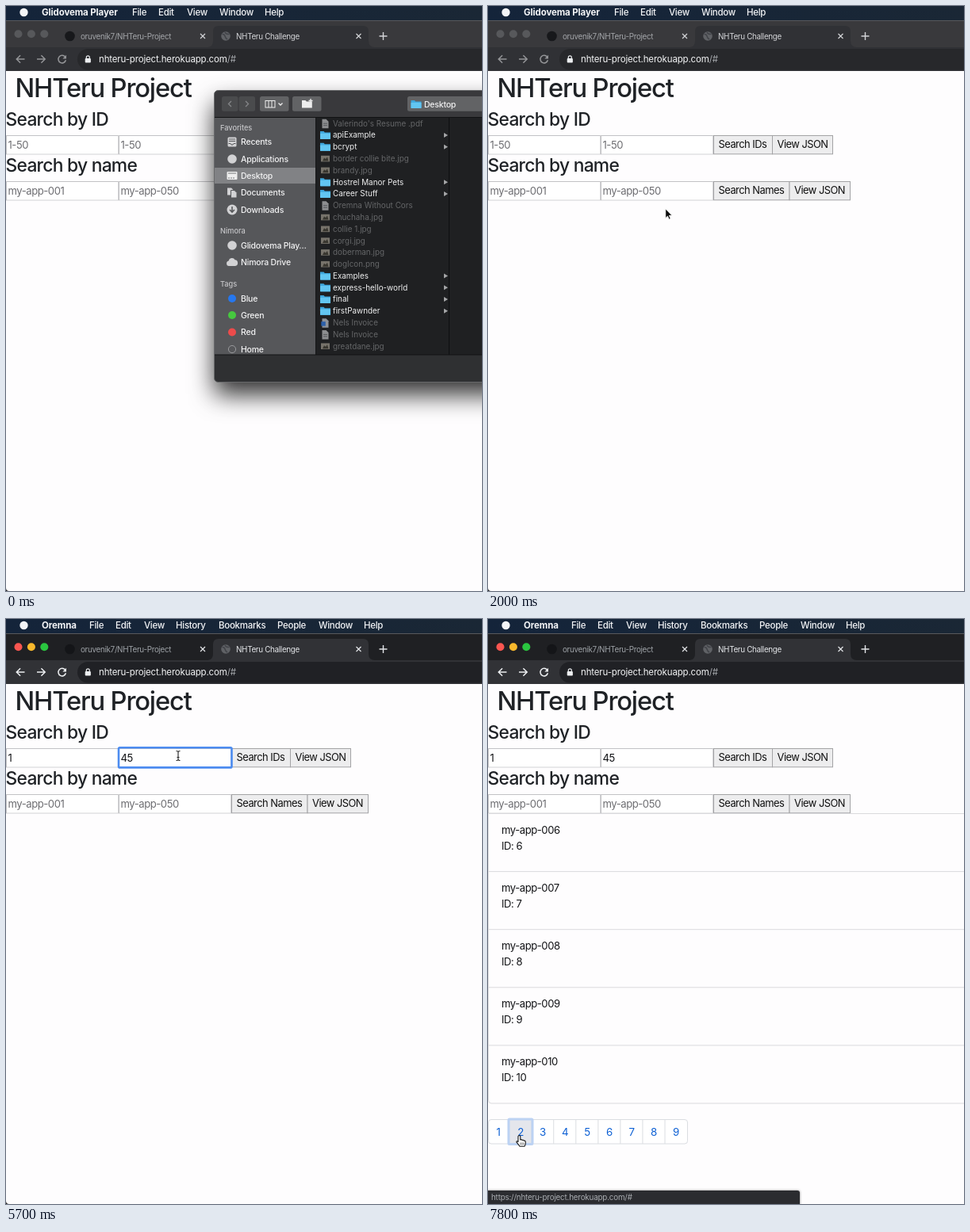
An HTML page for the animation above (8 s loop, 600 by 738 pixels).

```html
<!DOCTYPE html>
<html lang="en">
<head>
<meta charset="utf-8">
<title>Search demo</title>
<style>
  html, body { margin: 0; width: 100%; height: 100%; overflow: hidden; background: #fefdfe; }
  svg { display: block; width: 600px; height: 738px; font-family: Inter, Roboto, "Liberation Sans", sans-serif;
    --strip: #39393c; --bar: #303135; --pill: #27282b; --nav: #939497; --tab: #a2a4a8; --tabOn: #d3d4d7; --mark: #17181b; }
  svg.active { --strip: #1f2023; --bar: #313236; --pill: #202125; --nav: #eceef0; --tab: #9da1a6; --tabOn: #e3e5e8; --mark: #141518; }
  text { white-space: pre; }
  .menu { font-size: 11.5px; font-weight: 500; letter-spacing: -.025em; fill: #f4f5f7; }
  .app { font-weight: 700; letter-spacing: -.01em; }
  .tab { font-size: 9.9px; letter-spacing: -.033em; }
  .url { font-size: 11.5px; letter-spacing: -.014em; fill: #f3f4f5; }
  .h1 { font-size: 32.7px; font-weight: 500; letter-spacing: -.035em; fill: #1f2226; }
  .h3 { font-size: 22.8px; font-weight: 500; letter-spacing: -.032em; fill: #1f2226; }
  .body { font-size: 13.1px; letter-spacing: -.035em; fill: #121316; }
  .hint { fill: #6d6d71; }
  .btn { font-size: 12.9px; letter-spacing: -.04em; fill: #111; }
  .page { font-size: 13.3px; fill: #0d60d4; text-anchor: middle; }
  .head { font-size: 9.2px; font-weight: 500; fill: #c6c6c9; }
  .side { font-size: 10.5px; font-weight: 500; letter-spacing: -.02em; fill: #f2f2f3; }
  .file { font-size: 9.9px; fill: #656668; }
  .dir { fill: #f0f0f1; }
  .tip { font-size: 9.9px; letter-spacing: -.022em; fill: #a9acb0; }
  .nav { fill: none; stroke: var(--nav); stroke-width: 1.5; }
  filter { color-interpolation-filters: sRGB; }
</style>
</head>
<body>
<svg id="stage" viewBox="0 0 600 738" width="600" height="738"></svg>
<script>
const LOOP = 8000, STEP = 100;
const BRAND = 'NHTeru', SITE = 'nhteru-project.herokuapp.com';
const stage = document.getElementById('stage');

const text = (x, y, cls, str, more = '') => `<text x="${x}" y="${y}" class="${cls}" ${more}>${str}</text>`;
const rect = (x, y, w, h, fill, more = '') => `<rect x="${x}" y="${y}" width="${w}" height="${h}" fill="${fill}" ${more}/>`;
const circle = (x, y, r, fill, more = '') => `<circle cx="${x}" cy="${y}" r="${r}" fill="${fill}" ${more}/>`;
const path = (d, more) => `<path d="${d}" ${more}/>`;
const group = (id, inner) => `<g id="${id}">${inner}</g>`;
const line = (color, width = 1) => `fill="none" stroke="${color}" stroke-width="${width}"`;

function menu(id, app, items) {
  return group(id, text(45, 12, 'menu app', app) + items.map(([x, s]) => text(x, 12, 'menu', s)).join(''));
}

function lights(id, colors) {
  return group(id, colors.map((c, i) => circle(15.5 + i * 16.4, 35.3, 5, c)).join(''));
}

function browser() {
  const cross = x => path(`M${x - 3} 35l6 6m0 -6l-6 6`, line('var(--tabOn)', 1.2));
  return rect(0, 0, 600, 18, 'url(#sky)') +
    circle(22.5, 8, 5.2, '#f4f5f7') +
    menu('menuIdle', 'Glidovema Player', [[159, 'File'], [192, 'Edit'], [228, 'View'], [269, 'Window'], [326, 'Help']]) +
    menu('menuActive', 'Oremna', [[105, 'File'], [138, 'Edit'], [174, 'View'], [214, 'History'],
      [268, 'Bookmarks'], [342, 'People'], [394, 'Window'], [451, 'Help']]) +
    rect(0, 18, 600, 34, 'var(--strip)') + rect(0, 18, 600, 1, '#58595c') +
    lights('lightsIdle', ['#57585b', '#57585b', '#57585b']) +
    lights('lightsActive', ['#fb5650', '#f9b92c', '#2ac53f']) +
    path('M253 52Q261 52 261 44V32Q261 25 268 25H450Q457 25 457 32V44Q457 52 465 52Z', 'fill="var(--bar)"') +
    circle(80.5, 38, 6.3, 'var(--mark)') +
    text(94, 41.6, 'tab', `oruvenik7/${BRAND}-Project`, 'fill="var(--tab)"') + cross(248) +
    circle(277, 38, 5.8, '#606266') +
    path('M272.5 35.5q3 0 3.5 2.5t3 4M276 33q1 3 5.5 2.5', line('#414348', 1.5)) +
    text(290, 41.6, 'tab', `${BRAND} Challenge`, 'fill="var(--tabOn)"') + cross(444.5) +
    path('M470.5 38h10m-5 -5v10', line('var(--tabOn)', 1.4)) +
    rect(0, 52, 600, 30, 'var(--bar)') +
    rect(90, 54, 560, 26.5, 'var(--pill)', 'rx="13.2"') +
    path('M23.5 67H13.5m4.6 -4.8L13.3 67l4.8 4.8M39 67h10m-4.6 -4.8L49.2 67l-4.8 4.8', 'class="nav"') +
    path('M74.6 64.2A4.8 4.8 0 1 0 75.4 68.3', 'class="nav"') + path('M76 61.8v4.6h-4.6z', 'fill="var(--nav)"') +
    rect(99.7, 66, 7.2, 5.6, '#eceef0', 'rx="1"') + path('M101.3 66.5v-1.7a2 2 0 0 1 4 0v1.7', line('#eceef0', 1.2)) +
    `<text x="117" y="71.1" class="url">${SITE}<tspan fill="#a3a6aa">/#</tspan></text>`;
}

function field(x, y, id, hint) {
  return rect(x + .5, y + .5, 141, 23.5, '#fff', 'stroke="#d2d2d5"') +
    path(`M${x + .5} ${y + 24}V${y + .5}h141`, line('#c2c2c5')) +
    text(x + 2.5, y + 16.6, 'body hint', hint, `id="${id}"`);
}

function button(x, y, w, label) {
  return rect(x + .5, y + .5, w, 23.3, '#ededee', 'stroke="#a3a3a5"') + text(x + 6.5, y + 16.4, 'btn', label);
}

function page() {
  const ring = (id, x) => group(id, rect(x, 162.2, 142.5, 25.2, 'none', 'rx="1.5" stroke="#4c8cf0" stroke-width="2.6"'));
  return rect(0, 82, 600, 656, '#fefdfe') +
    text(11.5, 115, 'h1', `${BRAND} Project`) +
    text(-.5, 151, 'h3', 'Search by ID') + text(-.5, 209.2, 'h3', 'Search by name') +
    field(0, 163, 'from', '1-50') + field(142, 163, 'to', '1-50') +
    field(0, 221, 'nameFrom', 'my-app-001') + field(142, 221, 'nameTo', 'my-app-050') +
    button(284, 163, 74, 'Search IDs') + button(358, 163, 76, 'View JSON') +
    button(284, 221, 95.5, 'Search Names') + button(379.5, 221, 76.5, 'View JSON') +
    ring('ringFrom', .5) + ring('ringTo', 142) +
    rect(0, 168, 1, 14, '#111', 'id="caret"');
}

function results() {
  let s = path('M600 611H4Q.5 611 .5 607V245.5H600', line('#dadadd'));
  for (let i = 0; i < 5; i++) {
    const y = 245.5 + i * 73.1;
    if (i) s += path(`M0 ${y}H600`, line('#dadadd'));
    s += text(17, y + 25.4, 'body', '', `id="name${i}"`) + text(17, y + 45.2, 'body', '', `id="num${i}"`);
  }
  s += rect(.5, 631.5, 251, 30.5, '#fff', 'rx="3.5" stroke="#dadde1"') +
    rect(27, 632, 27.5, 29.5, '#e4e6ec', 'id="hover"');
  for (let i = 0; i < 9; i++) {
    if (i) s += path(`M${-1.4 + i * 28.05} 632V662`, line('#dadde1'));
    s += text(13.2 + i * 28, 652, 'page', i + 1);
  }
  return group('results', s + rect(26, 631, 30, 31.5, 'none', 'id="ringPage" rx="1" stroke="#bcd2f3" stroke-width="3"'));
}

const folder = (x, y) => path(`M${x - 6.5} ${y - 5}h4.5l1.3 1.5h7.2v8.5h-13z`, 'fill="#3ea6dc"') +
  rect(x - 6.5, y - 2.3, 13, 7.3, '#62c5f1', 'rx=".8"');

const fileIcon = {
  f: y => folder(402.5, y),
  d: y => path(`M398.5 ${y - 5.5}h5l3 3v8.5h-8z`, 'fill="#8d8e90"') + path(`M400 ${y}h5m-5 2.5h5`, line('#55575a')),
  w: y => path(`M398.5 ${y - 5.5}h5l3 3v8.5h-8z`, 'fill="#8d9299"') + rect(397.3, y - 1.5, 5.5, 5.5, '#2c5fa8'),
  i: y => rect(397, y - 3.8, 11, 7.6, '#77736b') + path(`M399 ${y + 3}l2 -4 2 1.5 2 -2.5 1.5 5z`, 'fill="#38362f"')
};

function dialog() {
  const files = ["d:Valerindo's Resume .pdf", 'f:apiExample', 'f:bcrypt', 'i:border collie bite.jpg', 'i:brandy.jpg',
    'f:Hostrel Manor Pets', 'f:Career Stuff', 'd:Oremna Without Cors', 'i:chuchaha.jpg', 'i:collie 1.jpg',
    'i:corgi.jpg', 'i:doberman.jpg', 'i:dogIcon.png', 'f:Examples', 'f:express-hello-world', 'f:final',
    'f:firstPawnder', 'w:Nels Invoice', 'd:Nels Invoice', 'i:greatdane.jpg'];
  const list = files.map((item, i) => {
    const [kind, name] = item.split(':'), y = 148.2 + i * 14.79, dir = kind === 'f';
    return fileIcon[kind](y) + text(412, y + 3.4, dir ? 'file dir' : 'file', name) +
      (dir ? path(`M552 ${y - 3}l5 3 -5 3z`, 'fill="#a5a6a8"') : '');
  }).join('');

  const g = '#d2d2d4', dark = '#57585b';
  const side = [
    [171.5, 'Recents', rect(279.5, 165.5, 11, 12, g, 'rx="1.5"') + path('M281 168h8m-8 2.5h8m-8.5 3h2.5l1 1.5h2l1 -1.5h2.5', line(dark))],
    [193, 'Applications', circle(285, 193, 5.8, g)],
    [214, 'Desktop', rect(278.5, 209, 13, 10, '#eee', 'rx="1"') + path('M280 211h10m-10 6h2m1 0h2m1 0h2', line('#77787b'))],
    [235.5, 'Documents', path('M279 229.5h5l2 2v7h-7z', `fill="${g}"`) + path('M283.5 232.5h4.5l3 3v6.5h-7.5z', `fill="${g}" stroke="${dark}"`)],
    [257, 'Downloads', circle(285, 257, 6.5, g) + path('M285 253v7m-3 -3l3 3 3 -3', line(dark, 1.6))],
    [302, 'Glidovema Play…', circle(285, 302, 5.8, g)],
    [323.5, 'Nimora Drive', path('M281 328a3.3 3.3 0 0 1 -.4 -6.5a4.3 4.3 0 0 1 8 -1.2a3.9 3.9 0 0 1 .4 7.7z', `fill="${g}"`)],
    [369, 'Blue', circle(285, 369, 5, '#2677ee')],
    [390, 'Green', circle(285, 390, 5, '#46c93f')],
    [411.5, 'Red', circle(285, 411.5, 5, '#ec4b4b')],
    [433, 'Home', circle(285, 433, 4.6, 'none', 'stroke="#98999c"')]
  ].map(([y, label, icon]) => icon + text(296, y + 3.8, 'side', label)).join('');

  const tool = (x, w, c) => rect(x, 114, w, 18.7, c, 'rx="2.5"');
  const clip = (inner, id) => `<g clip-path="url(#${id})">${inner}</g>`;
  return group('dialog',
    rect(262.5, 106.5, 400, 368, '#2f3032', 'rx="5" filter="url(#shade)"') +
    path('M263 141V111Q263 107 267 107H600V141Z', 'fill="#39393c"') +
    tool(272, 20.5, '#4a4b4d') + tool(293.5, 20.5, '#4a4b4d') +
    path('M284 120l-3.5 3.5 3.5 3.5M302 120l3.5 3.5 -3.5 3.5', line('#858689', 1.3)) +
    tool(320, 36.5, '#626365') + tool(361, 36.5, '#626365') + tool(506, 110, '#626365') +
    rect(327, 119.5, 12, 8.5, 'none', 'stroke="#eee"') + path('M331 119.5v8.5m4 -8.5v8.5', line('#eee')) +
    path('M343.5 122.5l2.5 2.5 2.5 -2.5', line('#eee', 1.3)) +
    path('M373 119h4.5l1.3 1.5h7v8h-12.8z', 'fill="#eee"') + path('M384 117v5m-2.5 -2.5h5', line('#eee', 1.3)) +
    folder(517, 124) + text(527, 128, 'side', 'Desktop') +
    rect(263, 141, 127, 299, '#56575a') + rect(263, 204, 127, 20, '#818285') +
    text(270, 156.5, 'head', 'Favorites') + text(270, 287.4, 'head', 'Nimora') + text(270, 354, 'head', 'Tags') +
    clip(side, 'pane') +
    rect(390, 141, 210, 299, '#1f2022') + clip(list, 'pane') +
    rect(558, 141, 1, 299, '#0e0f10') + rect(390, 141, 1, 299, '#161718') +
    path('M263 140.5H600M263 440H600', line('#121314')) +
    rect(262.5, 106.5, 400, 368, 'none', 'rx="5" stroke="#68696b"'));
}

function pointers() {
  return group('arrow', path('M0 0V11.8L2.7 9.3 4.5 13.4 6.5 12.5 4.7 8.5H8.3Z', 'fill="#0b0b0b" stroke="#fff" stroke-width=".9"')) +
    group('beam', path('M-2.5 -6Q0 -6 0 -4.5Q0 -6 2.5 -6M0 -4.5V4.5M-2.5 6Q0 6 0 4.5Q0 6 2.5 6M-1.5 2h3', line('#222', 1.1))) +
    group('hand', path('M-1.5 1Q0 -1 1.3 1V5.5Q2.8 4.6 3.6 6Q5 5.2 5.8 6.7Q7.5 6.2 7.8 8V10.5Q7.6 12 6.5 13.8H.5Q-1.5 10.8 -3.6 8.3Q-3.6 6.5 -1.5 8Z',
      'fill="#fff" stroke="#151515" stroke-width="1.1" stroke-linejoin="round"') + path('M1.5 9v3m2 -3v3m2 -3v3', line('#333', .7)));
}

stage.innerHTML = `<defs>
  <linearGradient id="sky"><stop stop-color="#14243a"/><stop offset="1" stop-color="#1a2735"/></linearGradient>
  <clipPath id="pane"><rect x="263" y="141" width="337" height="298.5"/></clipPath>
  <filter id="shade" filterUnits="userSpaceOnUse" x="180" y="40" width="560" height="560">
    <feDropShadow dx="0" dy="16" stdDeviation="15.5" flood-color="#000" flood-opacity=".8"/></filter>
  <filter id="soft" x="-5%" y="-60%" width="110%" height="220%">
    <feDropShadow dx="0" dy="0" stdDeviation="1.5" flood-opacity=".5"/></filter></defs>` +
  page() + results() + browser() + dialog() +
  path('M0 734Q0 738 4 738H0Z', 'fill="#222"') +
  group('tip', rect(-4, 721, 190, 24, '#2b2c30', 'id="tipBox" rx="3" filter="url(#soft)"') + text(4, 733, 'tip', `https://${SITE}/#`)) +
  pointers();

const $ = id => document.getElementById(id);

// Visible time spans of each part, in ms
const spans = {
  dialog: [[0, 1000]],
  menuIdle: [[0, 2400]], lightsIdle: [[0, 2400]],
  menuActive: [[2400, LOOP]], lightsActive: [[2400, LOOP]],
  ringFrom: [[2900, 4200]], ringTo: [[4200, 6200]],
  caret: [[2900, 3300], [3400, 3800], [4200, 4700], [5000, 5600]],
  results: [[6400, LOOP]], hover: [[6800, LOOP]], ringPage: [[7600, LOOP]], tip: [[7000, LOOP]],
  arrow: [[1500, 2600], [6100, 6800]], beam: [[2600, 3400], [5400, 6100]], hand: [[6800, LOOP]]
};

// Pointer stops: time, x, y
const route = [[1500, 504, 424], [2300, 94, 178], [2500, 92.5, 174.5], [2900, 94, 175], [5400, 213, 174],
  [5700, 217, 172.5], [6200, 322, 175], [6400, 322, 175], [6800, 29, 656], [7000, 28.5, 655], [7300, 39.5, 651.5]];

function pointerAt(t) {
  const n = route.findIndex(p => p[0] > t);
  if (n < 1) return route[n < 0 ? route.length - 1 : 0].slice(1);
  const [a, b] = [route[n - 1], route[n]];
  const u = (t - a[0]) / (b[0] - a[0]), k = u * u * (3 - 2 * u);
  return [1, 2].map(i => a[i] + (b[i] - a[i]) * k);
}

function fill(id, value, hint) {
  $(id).textContent = value || hint;
  $(id).setAttribute('class', value ? 'body' : 'body hint');
}

function draw(time) {
  const t = Math.floor(time / STEP) * STEP;
  for (const id in spans) {
    $(id).style.display = spans[id].some(([a, b]) => t >= a && t < b) ? '' : 'none';
  }
  stage.classList.toggle('active', t >= 2400);

  const from = t >= 3400 ? '1' : '', to = t >= 5200 ? '45' : t >= 5000 ? '4' : '';
  fill('from', from, '1-50');
  fill('to', to, '1-50');
  $('caret').setAttribute('x', t < 4200 ? 2.5 + from.length * 6 : 144.5 + to.length * 8);

  const first = t >= 7600 ? 6 : 1;
  for (let i = 0; i < 5; i++) {
    $('name' + i).textContent = 'my-app-' + String(first + i).padStart(3, '0');
    $('num' + i).textContent = 'ID: ' + (first + i);
  }
  const grow = Math.min(1, Math.max(0, (t - 7600) / 200));
  $('tipBox').setAttribute('width', 190 + 207 * grow);

  const [x, y] = pointerAt(t);
  for (const id of ['arrow', 'beam', 'hand']) $(id).setAttribute('transform', `translate(${x} ${y})`);
}

function tick() {
  draw(performance.now() % LOOP);
  requestAnimationFrame(tick);
}
tick();
</script>
</body>
</html>
```
